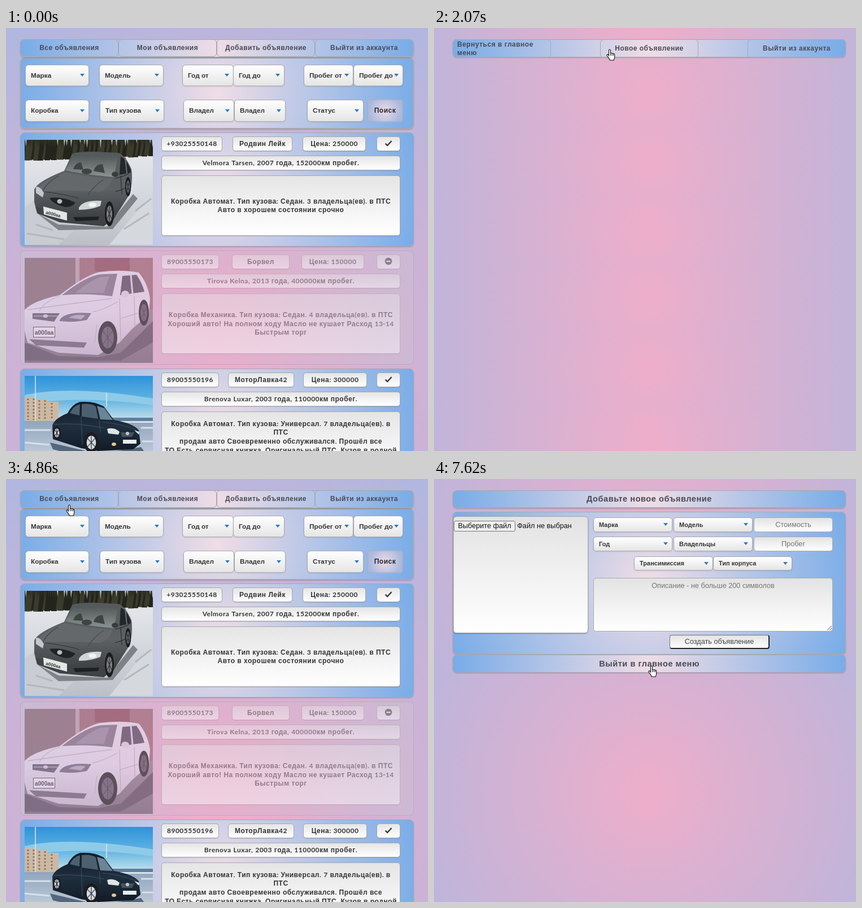
These frames come from a looping animation (747x749 px, 8000 ms). An HTML page:

```html
<!DOCTYPE html>
<html lang="ru">
<head>
<meta charset="utf-8">
<title>Объявления</title>
<style>
html, body { margin: 0; width: 100%; height: 100%; overflow: hidden; }
* { box-sizing: border-box; }
#stage { position: relative; width: 747px; height: 749px; overflow: hidden; font: bold 12px/15px "Liberation Sans", Arial, sans-serif; color: #333; }
.page { position: absolute; inset: 0; overflow: hidden; display: none;
  background: radial-gradient(circle, #eeaeca, #94bbe9) -387px -68px / 1536px var(--h); }
.page.on { display: block; }
.in { position: absolute; left: var(--dx); top: 0; }
.b { position: absolute; display: flex; align-items: center; justify-content: center; text-align: center; white-space: pre; }
.panel { border: 2px solid #a7a9ae; border-radius: 8px; background: radial-gradient(circle, #f0dde6, #78ace8) border-box; box-shadow: 0 1px 2px rgba(0,0,0,.2); }
.panel.thin { border-width: 1px; }
.tab { border: 1px solid #a7a9ae; border-radius: 6px; color: #4a4a54; letter-spacing: .5px; }
.tab.hover { transform: translateY(-2px); box-shadow: 0 0 5px rgba(40,40,70,.45); }
.tab.left { justify-content: flex-start; text-align: left; padding-left: 7px; }
.sel { justify-content: flex-start; padding-left: 9px; font-size: 11.8px; border: 1px solid #aaa; border-radius: 6px;
  background: linear-gradient(#fff, #e5e5e5); box-shadow: 0 1px 1px 1px rgba(0,0,0,.05); }
.sel::after { content: ""; position: absolute; right: 7.5px; top: calc(50% - 3px); border: 4.3px solid transparent; border-top: 5px solid #2b7bbb; border-bottom: 0; }
.sel.s { font-size: 11px; border-radius: 5px; }
.find { border: 2px solid rgba(165,170,185,.55); border-radius: 6px; letter-spacing: .5px; color: #26262c;
  background: radial-gradient(circle, #ecdbe6, #a9b9dd 75%) border-box; }
.pill { border: 1px solid #a9a9a9; border-radius: 5px; background: linear-gradient(#e5e5e5, #fff); letter-spacing: .5px; box-shadow: 0 1px 1px rgba(0,0,0,.12); }
.pill i { font: bold 12px/15px Lato, "Open Sans", sans-serif; }
.sold { border: 1px solid rgba(170,165,185,.6); border-radius: 8px; background: radial-gradient(circle, rgba(232,172,202,.5), rgba(203,188,212,.7)); }
.dim .pill { opacity: .43; }
.dim svg.photo { opacity: .65; }
.photo { position: absolute; }
.bar { border: 1px solid #a7a9ae; border-radius: 7px; color: #4a4a54; font-size: 14.6px; letter-spacing: .52px; }
.bar.hover { transform: translateY(-2px); }
.field { border: 1px solid #aaa; border-radius: 5px; background: linear-gradient(#e3e3e3, #fff); font-weight: 400; font-size: 12.7px; color: #757575; }
.file { border-radius: 6px; box-shadow: 0 1px 2px rgba(0,0,0,.3); }
.area { align-items: flex-start; padding-top: 6px; }
.plain { font-weight: 400; font-size: 12.7px; color: #111; }
.choose { border: 1px solid #767676; border-radius: 3px; background: #efefef; }
.make { border: 2px outset #777; border-width: 1px 2px 2px 1px; border-radius: 4px; background: linear-gradient(#e3e3e3, #fff); color: #444; }
#hand { position: absolute; left: 0; top: 0; }
</style>
</head>
<body>
<div id="stage">
  <div class="page" id="list"><div class="in"></div></div>
  <div class="page" id="mine" style="--h:122px;--dx:0px"><div class="in"></div></div>
  <div class="page" id="add" style="--h:415px;--dx:0px"><div class="in"></div></div>
  <svg id="hand" width="17" height="22" viewBox="0 0 17 22">
    <path d="M4.5 12V2.5a1.5 1.5 0 0 1 3 0V8c0-1.2 2.6-1.1 2.6.4 0-1.1 2.4-.9 2.4.6 0-.9 2.2-.6 2.2 1V14c0 3-1 3.5-1.4 6H6.3C5.8 17.5 3 14.8 1.3 12 .3 10 2.4 9 3.4 10.4z" fill="#fff" stroke="#111" stroke-width="1.1"/>
    <path d="M7.5 8v4M10.1 8.5V12M12.5 9.3V12" stroke="#111" fill="none"/>
  </svg>
</div>
<script>
const $ = id => document.getElementById(id);
const box = (x, y, w, h, cls, html = '') =>
  `<div class="b ${cls}" style="left:${x}px;top:${y}px;width:${w}px;height:${h}px">${html}</div>`;
const mix = s => '<span>' + s.replace(/[A-Za-z0-9+,.:()]+/g, '<i>$&</i>') + '</span>';
const shape = (d, fill, more = '') => `<path d="${d}" fill="${fill}" ${more}/>`;
const line = (d, color, w = 1) => shape(d, 'none', `stroke="${color}" stroke-width="${w}"`);
const oval = (x, y, rx, ry, fill) => `<ellipse cx="${x}" cy="${y}" rx="${rx}" ry="${ry}" fill="${fill}"/>`;
const rect = (x, y, w, h, fill) => `<rect x="${x}" y="${y}" width="${w}" height="${h}" fill="${fill}"/>`;
const wheel = (x, y, rx, ry, rim) => oval(x, y, rx, ry, '#1b1b20') + oval(x, y, rx * .64, ry * .66, rim) +
  line(`M${x - rx * .5} ${y - ry * .4}L${x + rx * .5} ${y + ry * .4}M${x} ${y - ry * .62}V${y + ry * .62}M${x + rx * .5} ${y - ry * .4}L${x - rx * .5} ${y + ry * .4}`, '#33343a', 1.2);
const fade = (id, ...colors) => `<linearGradient id="${id}" x2="0" y2="1">` +
  colors.map((c, i) => `<stop offset="${i / (colors.length - 1)}" stop-color="${c}"/>`).join('') + '</linearGradient>';

let seed = 7;
const rnd = () => (seed = seed * 16807 % 2147483647) / 2147483647;

// Dark firs with paler gaps near the top
function trees() {
  let s = rect(0, 0, 227, 27, '#2f3025');
  for (let x = 0; x < 227; x += 4) {
    const foot = 35 - x * .035 + rnd() * 3, top = rnd() * 12;
    s += shape(`M${x - 5} ${foot}L${x} ${top - 6}L${x + 5} ${foot}z`, rnd() < .5 ? '#23251d' : '#3c3c2c');
    if (rnd() < .4) s += shape(`M${x + 1} 0h3L${x + 2.5} ${6 + rnd() * 12}z`, '#aeb6bb');
  }
  return s;
}

const photos = [
  fade('snow', '#e9ebee', '#d6d9de', '#bcc0c6') + fade('grey', '#55595b', '#5d6164', '#333739') + fade('glass', '#4f5857', '#8b9491') +
  rect(0, 0, 227, 186, 'url(#snow)') + trees() +
  shape('M0 120L22 104 24 136 90 158 60 186H0z', '#c9ccd2') + shape('M150 186L227 92V186z', '#d5d8dc') +
  line('M4 166L70 176M20 150L50 160M196 126L224 104M176 158L220 130', '#b3b7be', 3) +
  shape('M22 130L60 150 146 154 192 96 200 104 156 158 60 160z', '#7f8388') +
  shape('M17 88Q22 74 70 55L84 25Q92 21 122 21L165 23Q178 26 189 52 192 74 186 96L158 140 140 153 62 146 22 130 17 110z', 'url(#grey)') +
  shape('M72 54L87 27 165 30 158 66Q110 62 72 54z', 'url(#glass)') +
  shape('M86 52Q90 40 100 40L104 53zM122 55Q126 42 138 43L142 59z', '#3d4443') + oval(110, 56, 9, 5, '#3d4443') +
  shape('M168 62L170 30Q180 33 188 54L186 58z', '#23272a') + line('M178 31L181 60', '#6b6e72', 2) +
  shape('M22 86Q36 72 70 57 110 66 156 69 150 86 134 92 66 88 22 92z', '#64686b') + line('M60 64Q38 76 32 92M140 70Q122 82 112 98', '#484c4f', 1.5) +
  line('M160 68Q176 66 189 56M170 64L172 96M160 92Q176 88 187 80', '#2b2f32', 1.2) +
  shape('M96 120Q104 106 136 108L134 117Q118 124 96 124z', '#cfd4d5') + oval(120, 115, 7, 4, '#f2f4f4') +
  shape('M20 83Q28 82 34 94L32 102 20 94z', '#c3c8ca') + line('M96 104Q80 98 36 92', '#3b3f42', 1.5) +
  shape('M44 103Q66 100 90 111 84 120 72 119 50 114 44 103z', '#202326') + oval(62, 109, 4.500, 4, '#b9bdc0') +
  shape('M19 119L76 134 138 132 146 148 138 152 62 145 24 131z', '#3f4346') + shape('M86 137L132 136 130 142 90 144z', '#1d2023') +
  shape('M33 118L75 129 75 143 34 132z', '#e4e6e6') +
  `<text x="37" y="131" font-size="8" transform="rotate(14 37 131)" fill="#333">а000аа</text>` +
  wheel(150, 131, 8, 22, '#7d8083') + wheel(183, 83, 5, 17, '#6d7073') + oval(160, 61, 6, 4.500, '#3a3d40'),

  fade('road', '#8d7d8c', '#6f6072') + fade('white', '#e6dcec', '#e2d8ea', '#c6b8cf') +
  rect(0, 0, 227, 186, '#98606c') + rect(0, 0, 90, 92, '#83646e') + rect(90, 0, 7, 84, '#b79aa6') + rect(124, 0, 62, 24, '#8a4654') +
  rect(186, 0, 41, 100, '#9c6570') + rect(0, 92, 227, 94, 'url(#road)') +
  shape('M0 150L60 174 130 176 170 168 227 112V150L170 182H0z', '#55485a') +
  shape('M0 92Q15 76 62 66 108 30 133 25 170 20 202 26 218 45 222 72L220 100 190 126 168 150 130 172 60 168 5 150 0 130z', 'url(#white)') +
  shape('M66 66Q110 31 136 29L164 28 155 68Q110 62 66 66z', '#7c6a80') + shape('M90 62Q118 38 138 33L150 33 140 62z', '#93839a') +
  shape('M169 66L173 32 198 30Q208 44 212 60z', '#51445a') + line('M188 30L191 64', '#dcd2e2', 3) + oval(178, 64, 7, 6, '#d9cee0') +
  line('M6 92Q60 84 154 72M62 68Q36 76 26 94M120 96Q140 92 164 78M124 150L128 118', '#b9abc2', 1.3) +
  shape('M62 110Q72 94 118 98L110 110Q88 115 62 112z', '#6b6078') + shape('M78 106Q90 98 108 102L100 109z', '#a9a6bd') +
  shape('M14 98L62 98 52 113 14 108z', '#5b5064') + line('M16 103H58', '#b0a2b6', 1.5) +
  shape('M8 144L110 150 105 159 20 155z', '#6a5b6e') + oval(37, 103, 4, 3, '#cfc4d4') +
  rect(15, 122, 39, 19, '#ece4ee') + '<rect x="15.500" y="122.500" width="38" height="18" fill="none" stroke="#4a3e4e"/><text x="18" y="136" font-size="10" fill="#3a2f3e">а000аа</text>' +
  wheel(147, 141, 17, 29, '#5d5064') + wheel(211, 97, 9, 23, '#5d5064') + line('M168 72L170 146M194 68L195 120M168 108L200 98', '#ab9cb4'),

  fade('sky', '#2f93da', '#5fb2e2', '#cde6ec') + fade('ice', '#8fa4bc', '#b9c6d5', '#d5dde6') + fade('black', '#0f1a26', '#202f3e', '#111b26') +
  rect(0, 0, 227, 82, 'url(#sky)') + shape('M0 34Q80 16 227 40V52Q100 34 0 50z', '#8ecbe8') + rect(0, 78, 227, 108, 'url(#ice)') +
  shape('M0 38H18V41H40V46H60V80H0z', '#cdb8a2') + shape('M6 40V78M16 40V78M26 43V78M36 43V78M48 48V78', 'none', 'stroke="#8f7869" stroke-width="3" stroke-dasharray="3 3"') +
  rect(150, 74, 77, 6, '#5f7f9f') + rect(150, 80, 77, 3, '#d9e3ea') + line('M19 0V80M145 30V55', '#dfe6ea', 1.5) +
  line('M0 96H46M206 92H227M0 118L44 122M208 116H227', '#d7e0ea', 3) +
  shape('M45 118L130 138 206 126 212 134 130 150 50 130z', '#55677c') +
  shape('M49 88Q52 76 76 66 84 50 98 46 122 44 140 54L158 78Q192 84 202 96L205 120 192 130 130 133 100 128 50 112z', 'url(#black)') +
  shape('M80 66Q86 53 98 50L97 70zM101 50Q118 48 126 54L130 76 101 72z', '#4c6070') + shape('M128 53L141 57 156 78 134 77z', '#6b8496') +
  line('M52 86Q90 82 140 92M100 72L102 122M132 78L134 100M138 82Q170 84 198 96', '#3c5064') +
  shape('M146 94Q158 90 168 99L166 104 148 102zM194 96L203 99 202 104z', '#dde5e8') + shape('M170 100H194L190 108H172z', '#46525e') +
  oval(182, 102, 3, 3, '#c4cbd0') + rect(174, 113, 24, 7, '#e8ecef') + oval(158, 121, 4, 3, '#e2c98a') + wheel(118, 118, 13, 18, '#d3dbe2') + wheel(57, 101, 7, 12, '#d3dbe2')
];

const cars = [
  { phone: '+93025550148', who: 'Родвин Лейк', cost: '250000', pills: [275, 108, 401, 106, 525, 112],
    title: 'Velmora Tarsen, 2007 года, 152000км пробег.',
    text: 'Коробка Автомат. Тип кузова: Седан. 3 владельца(ев). в ПТС\nАвто в хорошем состоянии срочно' },
  { phone: '89005550173', who: 'Борвел', cost: '150000', pills: [275, 102, 400, 102, 523, 111], sold: true,
    title: 'Tirova Kelna, 2013 года, 400000км пробег.',
    text: 'Коробка Механика. Тип кузова: Седан. 4 владельца(ев). в ПТС\nХороший авто! На полном ходу Масло не кушает Расход 13-14\nБыстрым торг' },
  { phone: '89005550196', who: 'МоторЛавка42', cost: '300000', pills: [275, 102, 393, 117, 526, 113],
    title: 'Brenova Luxar, 2003 года, 110000км пробег.',
    text: 'Коробка Автомат. Тип кузова: Универсал. 7 владельца(ев). в\nПТС\nпродам авто Своевременно обслуживался. Прошёл все\nТО,Есть сервисная книжка. Оригинальный ПТС. Кузов в родной\nкраске.' }
];
const icon = sold => '<svg width="14" height="14" viewBox="0 0 14 14" style="margin-top:-2px">' + (sold
  ? oval(7, 7, 6.3, 6.3, '#333') + rect(3.5, 6, 7, 2.2, '#fff')
  : line('M1.5 7.5L5 11 12.500 3', '#333', 2.3)) + '</svg>';

function card(c, i) {
  const y = 185 + 209 * i, p = c.pills;
  return `<div class="${c.sold ? 'dim' : ''}">` + box(25, y, 697, 202, c.sold ? 'sold' : 'panel thin') +
    `<svg class="photo" style="left:32.5px;top:${y + 13}px" width="227" height="186">${photos[i]}</svg>` +
    box(p[0], y + 7, p[1], 26, 'pill', mix(c.phone)) + box(p[2], y + 7, p[3], 26, 'pill', mix(c.who)) +
    box(p[4], y + 7, p[5], 26, 'pill', mix('Цена: ' + c.cost)) + box(656, y + 7, 42, 26, 'pill', icon(c.sold)) +
    box(275, y + 41, 423, 26, 'pill', mix(c.title)) + box(275, y + 76, 423, 107, 'pill', mix(c.text)) + '</div>';
}

const tabs = {
  list: [[25, 'Все объявления'], [199, 'Мои объявления'], [373, 'Добавить объявление'], [547, 'Выйти из аккаунта']],
  mine: [[33, 'Вернуться в главное\nменю'], [294, 'Новое объявление'], [555, 'Выйти из аккаунта']]
};
const nav = (id, y, h) => tabs[id].map(([x, s], i) => box(x, y, 174, h, 'tab' + (id == 'mine' && !i ? ' left' : ''), s)).join('');
const sels = (y, h, cls, list) => list.map(([x, w, s]) => box(x, y, w, h, 'sel ' + cls, s)).join('');
const fill = (id, html) => $(id).firstElementChild.innerHTML = html;

fill('list', box(25, 52, 697, 127, 'panel') + box(25, 20, 697, 32, 'panel thin') + nav('list', 20, 31) +
  sels(65, 38, '', [[34, 113, 'Марка'], [165, 114, 'Модель'], [312, 91, 'Год от'], [402, 91, 'Год до'], [527, 88, 'Пробег от'], [615, 88, 'Пробег до']]) +
  sels(127, 39, '', [[34, 113, 'Коробка'], [166, 114, 'Тип кузова'], [314, 90, 'Владел'], [404, 91, 'Владел'], [533, 100, 'Статус']]) +
  box(639, 126, 64, 41, 'find', 'Поиск') + '<div id="cards">' + cars.map(card).join('') + '</div>');

fill('mine', box(33, 20, 696, 32, 'panel thin') + nav('mine', 20, 33));

fill('add', box(33, 20, 696, 32, 'panel thin') + box(33, 20, 696, 31, 'bar', 'Добавьте новое объявление') +
  box(33, 58, 696, 253, 'panel thin') + box(34, 66, 239, 207, 'field file') +
  box(35, 74, 109, 19, 'plain choose', 'Выберите файл') + box(146, 74, 99, 19, 'plain', 'Файл не выбран') +
  sels(68, 26, 's', [[282, 140, 'Марка'], [424, 140, 'Модель']]) + box(566, 68, 140, 26, 'field', 'Стоимость') +
  sels(102, 26, 's', [[282, 140, 'Год'], [424, 140, 'Владельцы']]) + box(566, 102, 140, 26, 'field', 'Пробег') +
  sels(137, 25, 's', [[354, 140, 'Трансимиссия'], [494, 140, 'Тип корпуса']]) +
  box(282, 175, 424, 95, 'field area', 'Описание - не больше 200 символов') +
  `<svg class="photo" style="left:695px;top:259px" width="9" height="9">${line('M1 9L9 1M5 9L9 5', '#555')}</svg>` +
  box(417, 276, 177, 25, 'plain make', 'Создать объявление') +
  box(33, 313, 696, 32, 'panel thin bar', 'Выйти в главное меню'));

// Pointer legs: first step, last step, number of steps, way points
const legs = [
  [590, 1380, 11, [470, 525], [640, 40], [520, 10], [60, 34], [170, 38]],
  [1430, 1430, 1, [310, 38]],
  [1630, 1740, 2, [301, 28], [310, 38]],
  [2440, 3190, 12, [300, 40], [170, 34], [120, 38], [330, 38], [440, 34], [526, 40]],
  [3270, 3390, 3, [560, 36], [650, 40]],
  [3590, 3590, 1, [655, 42]],
  [3670, 3940, 5, [560, 40], [104, 35]],
  [4140, 4210, 2, [104, 38], [109, 44]],
  [4410, 4410, 1, [111, 46]],
  [5110, 5320, 4, [180, 48], [434, 34]],
  [5520, 5590, 2, [433, 31], [441, 41]],
  [5750, 5750, 1, [440, 42]],
  [6800, 7490, 10, [440, 38], [420, 200], [383, 337]],
  [7620, 7620, 1, [384, 331]]
];
function pointer(t) {
  const leg = legs.filter(l => l[0] <= t).pop();
  if (!leg) return null;
  const [a, b, n, ...pts] = leg;
  if (n == 1) return pts[0];
  const k = Math.min(n - 1, Math.floor((t - a) / (b - a) * (n - 1) + 1e-6));
  const u = k / (n - 1) * (pts.length - 1), i = Math.min(pts.length - 2, Math.floor(u));
  return [0, 1].map(j => Math.round(pts[i][j] + (pts[i + 1][j] - pts[i][j]) * (u - i)));
}

// Start, page, time of the first pointer move on it
const scenes = [[0, 'list', 590], [2010, 'mine', 2440], [4600, 'list', 5110], [5890, 'add', 6800]];
const back = document.querySelector('#add .panel.bar');

function draw(t) {
  const [, id, live] = scenes.filter(s => s[0] <= t).pop();
  for (const p of document.querySelectorAll('.page')) p.classList.toggle('on', p.id == id);
  const empty = t >= 4600 && t < 4780;
  $('list').style.setProperty('--h', empty ? '249px' : '1300px');
  $('list').style.setProperty('--dx', empty ? '7.5px' : '0px');
  $('cards').style.display = empty ? 'none' : '';

  const pos = pointer(t), [x, y] = pos || [-99, -99];
  $('hand').style.display = pos ? '' : 'none';
  $('hand').style.transform = `translate(${x - 5}px,${y - 1}px)`;
  for (const key in tabs) $(key).querySelectorAll('.tab').forEach((el, i) => {
    const d = x - tabs[key][i][0];
    el.classList.toggle('hover', key == id && t >= live && d >= 0 && d < 174 && y >= 18 && y < 52);
  });
  back.classList.toggle('hover', id == 'add' && y > 310 && y < 345);
}

const start = performance.now();
function tick() {
  draw((performance.now() - start) % 8000);
  requestAnimationFrame(tick);
}
tick();
</script>
</body>
</html>
```
